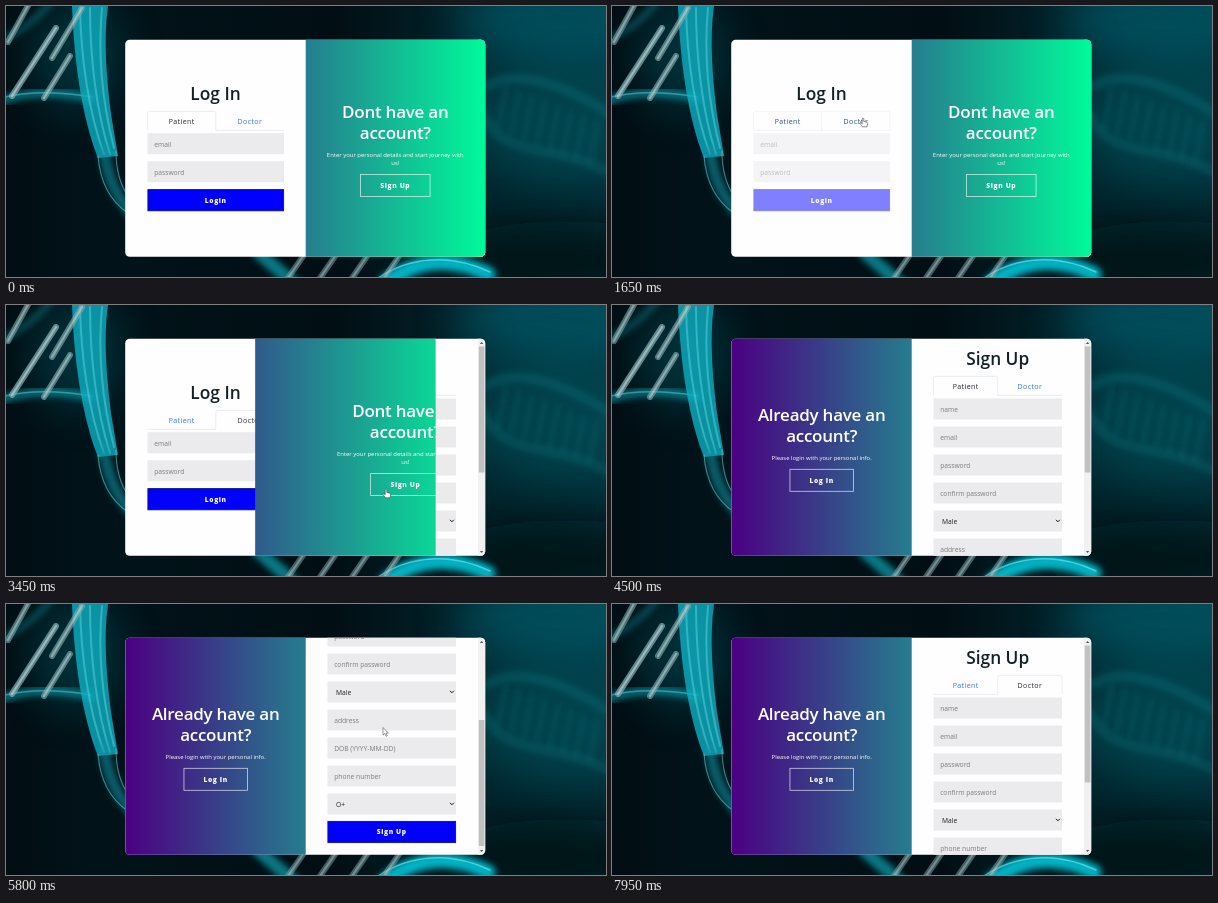
An HTML page for the animation above (8 s loop, 600 px wide and 271 px high).

```html
<!DOCTYPE html>
<html lang="en">
<head>
<meta charset="utf-8">
<title>Log in and sign up</title>
<style>
  html, body { margin: 0; height: 100%; overflow: hidden; background: #010d12; }
  svg { display: block; width: 600px; height: 271px; }
  text { font: 6.7px "Open Sans", "Noto Sans", sans-serif; }
  .title { font-size: 17.3px; font-weight: 600; fill: #142026; text-anchor: middle; }
  .title.light { font-size: 17px; letter-spacing: -.25px; fill: #fff; }
  .tab { font-size: 7px; letter-spacing: .4px; text-anchor: middle; }
  .hint { fill: #7b7b80; }
  .choice { fill: #222; }
  .button { font-weight: 800; letter-spacing: .6px; fill: #fff; text-anchor: middle; }
  .note { font-size: 5.95px; fill: #fff; text-anchor: middle; }
  .line { fill: none; stroke-linecap: round; }
</style>
</head>
<body>
<svg id="stage" viewBox="0 0 600 271"></svg>
<script>
const LOOP = 8000, FADE = 150;
const LOGIN_TAB_CLICK = 1575, SLIDE_START = 3238, SLIDE_TIME = 600, SIGNUP_TAB_CLICK = 7050;
const SCROLL_MAX = 128;

const stage = document.getElementById('stage');
const clamp = v => Math.min(1, Math.max(0, v));
const ease = v => .5 - .5 * Math.cos(Math.PI * clamp(v));
const text = (x, y, words, kind, id = '') => `<text x="${x}" y="${y}" class="${kind}" id="${id}">${words}</text>`;
const rect = (x, y, w, h, look) => `<rect x="${x}" y="${y}" width="${w}" height="${h}" ${look}/>`;
const line = (d, color, width, alpha = 1, extra = '') =>
  `<path class="line" d="${d}" stroke="${color}" stroke-width="${width}" opacity="${alpha}" ${extra}/>`;
const glow = (x, y, rx, ry, color, alpha) =>
  `<ellipse cx="${x}" cy="${y}" rx="${rx}" ry="${ry}" fill="${color}" opacity="${alpha}" filter="url(#haze)"/>`;

const soft = 'filter="url(#soft)"', blur = 'filter="url(#blur)"';

function rung(x1, y1, x2, y2, alpha = .6) {
  const d = `M${x1} ${y1}L${x2} ${y2}`;
  return line(d, '#7fa9ae', 6, alpha, soft) + line(d, '#d3e6e6', 2.2, alpha * .7, soft);
}

function background() {
  let far = '';
  for (let i = 0; i < 8; i++) {
    const x = 500 + i * 13, y = 82 + i * 5;
    far += line(`M${x} ${y}L${x - 8} ${y + 40}`, '#0a6a74', 6, .28, blur);
  }
  return rect(0, 0, 600, 271, 'fill="url(#night)"') +
    glow(560, 15, 110, 45, '#066473', .6) + glow(550, 115, 90, 60, '#05545f', .55) +
    glow(560, 255, 130, 40, '#000a0e', .75) + glow(70, 50, 45, 55, '#066a78', .35) +
    far +
    line('M482 80C510 62 560 78 610 112', '#0b7580', 10, .35, blur) +
    line('M478 110C500 155 550 135 610 170', '#0b6c76', 10, .35, blur) +
    // left strand with its ribbon
    line('M-5 34C15 26 35 10 46 -6', '#12909f', 7, .4, blur) +
    line('M-5 95C25 84 55 86 85 92', '#10a3b2', 9, .6, blur) +
    line('M-5 92C25 84 55 86 85 91', '#5cc5cf', 1.5, .55, soft) +
    `<path d="M66 0H102C97 35 101 75 105 108L112 150L92 152C76 112 68 55 66 0Z" fill="#0eafc2" opacity=".8" ${soft}/>` +
    line('M74 2C75 50 82 105 98 148M84 2C84 50 90 105 104 148M96 2C92 45 96 95 108 142', '#5fdde8', 2, .45, soft) +
    line('M98 145C102 175 112 192 126 208', '#0d93a3', 11, .6, blur) +
    line('M92 150C94 175 104 195 122 207M110 145C110 165 115 180 122 190', '#6cc6ce', 1.1, .6, soft) +
    rung(2, 36, 24, -4, .6) + rung(6, 90, 50, 22, .75) + rung(38, 92, 64, 50, .65) + rung(46, 52, 76, 2, .65) +
    // lower strand
    line('M252 246C262 256 274 264 290 280', '#0fa5b5', 13, .7, blur) +
    line('M380 276C410 254 445 250 482 268', '#00cfe2', 15, .85, blur) +
    line('M372 272C405 250 445 248 484 266', '#7deaf2', 1.5, .6, soft) +
    [300, 332, 364, 396].map(x => rung(x, 246, x - 20, 275, .5)).join('');
}

function tabs(id, x, y, w) {
  const half = w / 2;
  const one = (name, i) => {
    const left = x + i * half;
    const d = `M${left} ${y + 19}V${y + 2}Q${left} ${y} ${left + 2} ${y}H${left + half - 2}Q${left + half} ${y} ${left + half} ${y + 2}V${y + 19}`;
    return `<g id="${id}Box${i}"><path d="${d}" fill="#fefdff" stroke="#e3e5ea" stroke-width=".7"/>` +
      rect(left + .5, y + 18, half - 1, 2, 'fill="#fefdff"') + '</g>' +
      text(left + half / 2, y + 12.2, name, 'tab', `${id}Tab${i}`);
  };
  return rect(x, y + 18.6, w, .7, 'fill="#e3e5ea"') + one('Patient', 0) + one('Doctor', 1);
}

function fields(names, x, y, w) {
  return names.map((name, i) => {
    const top = y + i * 28, isChoice = name === 'Male' || name === 'O+';
    return rect(x, top, w, 21, 'fill="#ebeaec"') +
      text(x + (isChoice ? 8.5 : 6.7), top + 13.3, name, isChoice ? 'choice' : 'hint') +
      (isChoice ? line(`M${x + w - 5.8} ${top + 9.6}l1.7 1.7l1.7 -1.7`, '#111', 1) : '');
  }).join('');
}

const submit = (name, x, y, w) =>
  rect(x + .4, y + .4, w - .8, 21.2, 'fill="#00f" stroke="#101080" stroke-width=".9"') +
  text(x + w / 2, y + 13.4, name, 'button');

const panel = (id, x, y, heading, notes, label, w, buttonY) => `<g id="${id}">` +
  [heading, 'account?'].map((s, i) => text(x, y + i * 21, s, 'title light')).join('') +
  notes.map((s, i) => text(x, y + 39 + i * 8, s, 'note')).join('') +
  rect(x - w / 2, buttonY, w, 22, 'fill="none" stroke="#fff" stroke-width=".8" opacity=".75"') +
  text(x, buttonY + 13.6, label, 'button') + '</g>';

const common = ['name', 'email', 'password', 'confirm password', 'Male'];
const patient = [...common, 'address', 'DOB (YYYY-MM-DD)', 'phone number', 'O+'];
const doctor = [...common, 'phone number'];

stage.innerHTML = `<defs>
  <linearGradient id="night"><stop stop-color="#010e13"/><stop offset=".15" stop-color="#011319"/>
    <stop offset=".55" stop-color="#010f14"/><stop offset=".8" stop-color="#02252d"/><stop offset="1" stop-color="#02303a"/></linearGradient>
  <linearGradient id="shade" gradientUnits="userSpaceOnUse" x1="120" x2="480">
    <stop stop-color="#4b0082"/><stop offset="1" stop-color="#00fa9a"/></linearGradient>
  <filter id="soft"><feGaussianBlur stdDeviation=".7"/></filter>
  <filter id="blur" x="-50%" y="-50%" width="200%" height="200%"><feGaussianBlur stdDeviation="3"/></filter>
  <filter id="haze" x="-60%" y="-60%" width="220%" height="220%"><feGaussianBlur stdDeviation="22"/></filter>
  <clipPath id="card">${rect(119.2, 33.7, 360, 217, 'rx="4.5"')}</clipPath>
  <clipPath id="window">${rect(299.7, 33, 180.5, 219, 'id="slider"')}</clipPath>
</defs>
${background()}
<g clip-path="url(#card)">
  ${rect(119, 33, 362, 219, 'fill="#fefdff"')}
  ${text(209.5, 94, 'Log In', 'title')}
  ${tabs('login', 141.5, 105.3, 136.5)}
  <g id="loginPane">${fields(['email', 'password'], 141.5, 127.2, 136.5)}${submit('Login', 141.5, 183.2, 136.5)}</g>
  <g id="signup">
    ${text(385.7, 60, 'Sign Up', 'title')}
    ${tabs('signup', 321.5, 71.3, 128.5)}
    <g id="patientPane">${fields(patient, 321.5, 93.5, 128.5)}${submit('Sign Up', 321.5, 345, 128.5)}</g>
    <g id="doctorPane">${fields(doctor, 321.5, 93.5, 128.5)}</g>
  </g>
  ${rect(472, 33, 8, 219, 'fill="#f1f1f1"')}
  ${rect(472.8, 41.5, 5.6, 126, 'id="thumb" fill="#c1c1c1"')}
  <path d="M473.9 39l1.7 -2l1.7 2zM473.9 246l1.7 2l1.7 -2z" fill="#555"/>
  <g clip-path="url(#window)">
    ${rect(119, 33, 362, 219, 'fill="url(#shade)"')}
    ${panel('leftPanel', 209.7, 116, 'Already have an', ['Please login with your personal info.'], 'Log In', 63.5, 164.3)}
    ${panel('rightPanel', 389.3, 112, 'Dont have an', ['Enter your personal details and start journey with', 'us!'], 'Sign Up', 69.5, 168.5)}
  </g>
</g>
<path id="arrow" d="M0 0V7.6L1.8 6L3 8.8L4.2 8.3L3 5.6H5.4Z" fill="#fff" stroke="#555" stroke-width=".6"/>
<path id="hand" d="M-.8 .6Q0 -.6 .8 .6V3.4L4 4.2Q4.7 4.5 4.6 5.5L4 8.8H-.6L-3 5.6Q-3 4.4 -1.8 4.9L-.8 5.8Z" fill="#fff" stroke="#444" stroke-width=".6"/>`;

const part = Object.fromEntries([...stage.querySelectorAll('[id]')].map(e => [e.id, e]));
const move = (e, x, y) => e.setAttribute('transform', `translate(${x} ${y})`);

// time, x, y, pointer shape until the next point
const pointer = [
  [0, 230, 152, ''], [1100, 230, 152, 'arrow'], [1380, 251, 112, 'hand'], [2050, 251, 112, 'arrow'],
  [2750, 380, 184, 'hand'], [3750, 380, 184, ''], [5000, 377, 123.5, 'arrow'], [6550, 377, 123.5, 'arrow'],
  [6850, 419, 80, 'hand'], [7350, 419, 80, ''], [LOOP, 419, 80, '']
];

function drawPointer(t) {
  const i = pointer.findIndex(p => p[0] > t) - 1;
  const [t0, x0, y0, shape] = pointer[i], [t1, x1, y1] = pointer[i + 1];
  const k = ease((t - t0) / (t1 - t0));
  for (const name of ['arrow', 'hand']) {
    part[name].style.opacity = +(name === shape);
    move(part[name], x0 + (x1 - x0) * k, y0 + (y1 - y0) * k);
  }
}

function drawTabs(id, t, click) {
  const toDoctor = clamp((t - click) / FADE);
  [1 - toDoctor, toDoctor].forEach((active, i) => {
    part[id + 'Box' + i].style.opacity = active;
    part[id + 'Tab' + i].style.fill = `color-mix(in srgb, #22282e ${active * 100}%, #2b76e6)`;
  });
}

// The old pane fades out, then the new one fades in.
const paneOpacity = (t, click) => Math.min(1, Math.abs((t - click) / FADE - 1));

function draw(t) {
  drawTabs('login', t, LOGIN_TAB_CLICK);
  drawTabs('signup', t, SIGNUP_TAB_CLICK);
  part.loginPane.style.opacity = paneOpacity(t, LOGIN_TAB_CLICK);

  const swapped = t >= SIGNUP_TAB_CLICK + FADE, fade = paneOpacity(t, SIGNUP_TAB_CLICK);
  part.patientPane.style.opacity = swapped ? 0 : fade;
  part.doctorPane.style.opacity = swapped ? fade : 0;

  const scroll = ease((t - 5000) / 550) - ease((t - 5950) / 300);
  move(part.signup, 0, -SCROLL_MAX * scroll);
  part.thumb.setAttribute('y', 41.5 + 74.5 * scroll);
  part.thumb.setAttribute('height', swapped ? 137 : 126);

  const slide = ease((t - SLIDE_START) / SLIDE_TIME);
  part.slider.setAttribute('x', 299.7 - 180.5 * slide);
  move(part.leftPanel, -36 * (1 - slide), 0);
  move(part.rightPanel, 36 * slide, 0);

  drawPointer(t);
}

function tick() {
  draw(performance.now() % LOOP);
  requestAnimationFrame(tick);
}
tick();
</script>
</body>
</html>
```
